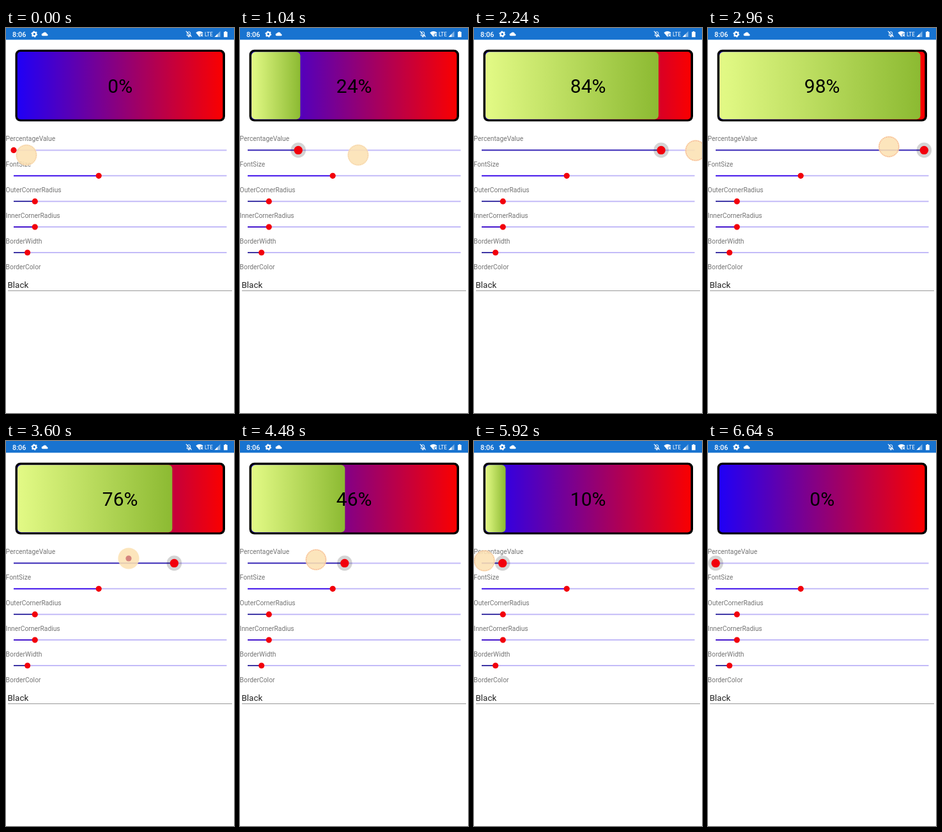
These frames come from a looping animation (357x600 px, 6720 ms). An HTML page:

```html
<!DOCTYPE html>
<html lang="en">
<head>
<meta charset="utf-8">
<title>Progress bar settings</title>
<style>
  html, body { margin: 0; width: 100%; height: 100%; overflow: hidden; background: #fff; }
  svg { display: block; width: 100%; height: 100%; font-family: Roboto, "Liberation Sans", sans-serif; }
</style>
</head>
<body>
<svg viewBox="0 0 357 600">
  <defs>
    <linearGradient id="back"><stop stop-color="#2000f6"/><stop offset="1" stop-color="#fa0000"/></linearGradient>
    <linearGradient id="front"><stop stop-color="#e3fa86"/><stop offset="1" stop-color="#8cba32"/></linearGradient>
  </defs>

  <rect width="357" height="18.3" fill="#1873d0"/>
  <g fill="#fff">
    <text x="10" y="13.5" font-size="10.9" font-weight="500">8:06</text>
    <circle cx="44.3" cy="9.5" r="2.8" fill="none" stroke="#fff" stroke-width="2.3"/>
    <circle cx="44.3" cy="9.5" r="4.3" fill="none" stroke="#fff" stroke-width="1.4" stroke-dasharray="1.9 2.6"/>
    <path d="M57.5 12.3a2 2 0 0 1 .3-4 3.4 3.4 0 0 1 6.2 .6 1.8 1.8 0 0 1 .6 3.4z"/>
    <path d="M283 11.7h6.6l-.9-1.3V8.3a2.4 2.4 0 0 0-4.8 0v2.1z M285.3 12.6h2v1.2h-2z" fill="none" stroke="#fff" stroke-width="1"/>
    <path d="M281.8 4.8l8.8 9" stroke="#fff" stroke-width="1.1"/>
    <path d="M297.3 7.2q5.6-4.2 11.4 0L303 14z"/>
    <path d="M304.3 9.2l4 4m0-4l-4 4" stroke="#1873d0" stroke-width="3"/>
    <path d="M304.6 9.5l3.6 3.6m0-3.6l-3.6 3.6" stroke="#fff" stroke-width="1.2"/>
    <text x="311" y="13" font-size="8.3">LTE</text>
    <path d="M335.5 5v9h-9z" fill-opacity=".45"/>
    <path d="M331.3 9.2V14h-4.8z"/>
    <path d="M341 6h1.7V4.9h2.3V6h1.7v8.2H341z"/>
  </g>

  <rect x="14.5" y="33.7" width="328.5" height="111.8" rx="8" fill="#000"/>
  <rect x="17.8" y="37" width="321.6" height="105.4" rx="5" fill="url(#back)"/>
  <rect id="fill" x="18" y="37.3" height="105" rx="6" fill="url(#front)"/>
  <text id="percent" x="178.7" y="101" font-size="30" text-anchor="middle"></text>

  <g id="sliders"></g>

  <text x="2.5" y="404.5" font-size="13.4" fill="#222">Black</text>
  <path d="M3 409.5H354" stroke="#999"/>

  <g id="touch">
    <circle r="16.6" fill="#fce2b3" fill-opacity=".88"/>
    <circle id="rim" r="15.3" fill="none" stroke-dasharray="1.2 1.6"/>
    <circle id="dot" r="4.6" fill="#d5837d"/>
  </g>
</svg>
<script>
const LOOP = 6720, STEP = 80, LEFT = 12, SPAN = 333;
const $ = id => document.getElementById(id);

// Keys are [time, ...values], linear in between.
const VALUE = [[0, 0], [400, 0], [1040, 23.8], [2240, 84.4], [2640, 100], [2880, 100],
  [2960, 98], [3600, 75.5], [4480, 45.6], [5200, 27.5], [6320, 0]];
const TOUCH = [[0, 32, 198], [160, 36, 198], [640, 95, 198], [1040, 185, 198], [2240, 347, 191],
  [2560, 347, 188], [3100, 261, 184], [3600, 192, 183], [4480, 119, 185], [5200, 69, 185],
  [5760, 25, 186], [6000, 12, 187]];

function sample(keys, t) {
  const next = keys.findIndex(key => key[0] > t);
  if (next < 0) return keys[keys.length - 1].slice(1);
  const a = keys[next - 1], b = keys[next];
  const k = (t - a[0]) / (b[0] - a[0]);
  return a.slice(1).map((v, i) => v + (b[i + 1] - v) * k);
}

const SLIDERS = [["PercentageValue", 0, "#3020b0"], ["FontSize", 40, "#3500ea"],
  ["OuterCornerRadius", 10, "#30289c"], ["InnerCornerRadius", 10, "#3500c8"],
  ["BorderWidth", 6.5, "#30289c"], ["BorderColor"]];

$("sliders").innerHTML = SLIDERS.map(([label, value, color], i) => {
  const y = 190.4 + i * 39.9, x = LEFT + value / 100 * SPAN;
  const text = `<text x="-.4" y="${y - 14.3}" font-size="10.3" fill="#757575">${label}</text>`;
  if (!color) return text;
  const live = i === 0;
  return `${text}<path d="M${LEFT} ${y}H345.5" stroke="#c3bbf8" stroke-width="2"/>
    <path ${live ? 'id="track"' : ""} d="M${LEFT} ${y}H${x}" stroke="${color}" stroke-width="1.8"/>
    ${live ? `<circle id="halo" cy="${y}" r="11.8" fill="#000" fill-opacity=".17"/>` : ""}
    <circle ${live ? 'id="thumb"' : ""} cx="${x}" cy="${y}" r="4.6" fill="#f2000c"/>`;
}).join("");

function draw(t) {
  const [value] = sample(VALUE, t);
  const x = LEFT + value / 100 * SPAN;
  const pressed = t > 400;
  $("fill").setAttribute("width", value * 3.21);
  $("percent").textContent = Math.round(value) + "%";
  $("track").setAttribute("d", `M${LEFT} 190.4H${x}`);
  $("thumb").setAttribute("cx", x);
  $("thumb").setAttribute("r", pressed ? 6.7 : 4.6);
  $("halo").setAttribute("cx", x);
  $("halo").setAttribute("visibility", pressed ? "visible" : "hidden");

  // The pulse starts as a dot and ends as a reddening rim.
  const phase = (t + 135) % (1600 / 3);
  const isDot = phase < 90;
  const heat = Math.min(1, Math.max(0, (phase - 90) / 150));
  $("touch").setAttribute("transform", `translate(${sample(TOUCH, t).join(" ")})`);
  $("touch").setAttribute("visibility", t < 6560 ? "visible" : "hidden");
  $("dot").setAttribute("opacity", isDot ? 1 : 0);
  $("rim").setAttribute("opacity", isDot ? 0 : 0.45 + 0.4 * heat);
  $("rim").setAttribute("stroke", `rgb(${215 + 25 * heat},${165 - 55 * heat},${130 - 30 * heat})`);
}

const start = performance.now();
function tick() {
  const t = (performance.now() - start) % LOOP;
  draw(Math.floor(t / STEP) * STEP);
  requestAnimationFrame(tick);
}
tick();
</script>
</body>
</html>
```
